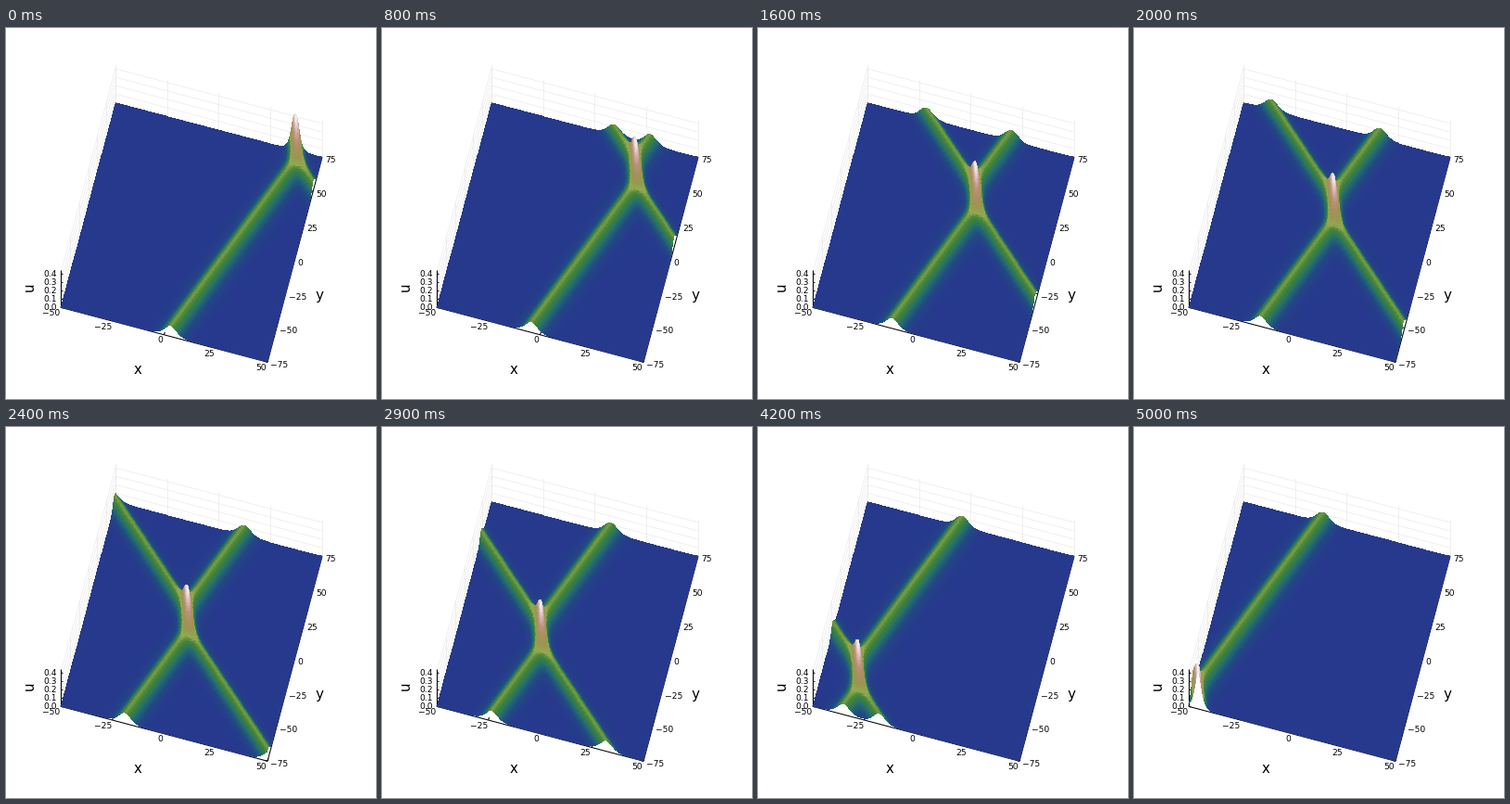
A matplotlib script that plays this animation: 399x400 px, repeating every 5.05 s.

```python
import numpy as np
import matplotlib.pyplot as plt
from matplotlib.animation import FuncAnimation
from matplotlib.collections import LineCollection
from matplotlib.colors import LinearSegmentedColormap

W, H, DPI = 399, 400, 100
FRAMES, STEP = 101, 50

# two line solitons of the KP equation with equal wave number K
K = 0.5
P1, P2 = -0.2625, 0.745
GAP = (P1 - P2) ** 2
A = GAP / (GAP - 4 * K * K)
TOP = 0.444

STOPS = [
    (0.00, "#26398c"), (0.02, "#25408a"), (0.05, "#204a80"),
    (0.10, "#20607a"), (0.16, "#2d7560"), (0.21, "#38803f"),
    (0.26, "#4f8a3a"), (0.285, "#7a9c48"), (0.31, "#94a850"),
    (0.42, "#98964f"), (0.55, "#a8905c"), (0.70, "#b9917a"),
    (0.82, "#cdaaa0"), (0.92, "#dfcccb"), (1.00, "#f2eef0"),
]
CMAP = LinearSegmentedColormap.from_list("relief", STOPS, N=512)


def project(x, y, z=0.0):
    px = 200 + 2.23 * x + 0.3933 * y
    py = 220.3 + 0.59 * x - 1.473 * y - 91 * z
    return px, py


def height(x, y, t):
    e1 = np.exp(K * (x + P1 * y + (K * K + 3 * P1 * P1) * t))
    e2 = np.exp(K * (x + P2 * y + (K * K + 3 * P2 * P2) * t))
    both = A * e1 * e2
    f = 1 + e1 + e2 + both
    fx = K * (e1 + e2 + 2 * both) / f
    fxx = K * K * (e1 + e2 + 4 * both) / f
    return 2 * (fxx - fx * fx)


def line(a, b):
    return [project(*a), project(*b)]


fig = plt.figure(figsize=(W / DPI, H / DPI), dpi=DPI, facecolor="white")
ax = fig.add_axes([0, 0, 1, 1])
ax.set_xlim(0, W)
ax.set_ylim(H, 0)
ax.axis("off")

xticks = range(-50, 51, 25)
yticks = range(-75, 76, 25)
zticks = [0, 0.1, 0.2, 0.3, 0.4]

grid = [line((x, 75, 0), (x, 75, TOP)) for x in xticks]
grid += [line((-50, y, 0), (-50, y, TOP)) for y in yticks]
for z in zticks:
    grid.append(line((-50, 75, z), (50, 75, z)))
    grid.append(line((-50, -75, z), (-50, 75, z)))
ax.add_collection(LineCollection(grid, colors="#eaeaea", linewidths=0.5, zorder=1))

axes = [line((-50, -75, 0), (50, -75, 0)),
        line((50, -75, 0), (50, 75, 0)),
        line((-50, -75, 0), (-50, -75, TOP))]
axes += [line((x, -75, 0), (x, -73, 0)) for x in xticks]
axes += [line((50, y, 0), (48.7, y, 0)) for y in yticks]
axes += [line((-50, -75, z), (-48.9, -75, z)) for z in zticks]
ax.add_collection(LineCollection(axes, colors="black", linewidths=0.75, zorder=2))


def label(x, y, text, px, **kw):
    ax.text(x, y, text, fontsize=px * 72 / DPI, family="DejaVu Sans",
            va="center_baseline", zorder=5, **kw)


def number(v):
    return str(v).replace("-", "\u2212")


for x in xticks:
    px, py = project(x, -75)
    label(px - 1, py + 5, number(x), 9.2, ha="right")
for y in yticks:
    px, py = project(50, y)
    label(px + 3, py + 2.5, number(y), 9.2, ha="left")
for z in zticks:
    px, py = project(-50, -75, z)
    label(px - 4, py - 0.3, f"{z:.1f}", 9.2, ha="right")
label(142, 367, "x", 15, ha="center")
label(338, 287, "y", 15, ha="center")
label(25, 281, "u", 15, ha="center", rotation=90)

# rows run from back to front so that nearer cells cover farther ones
X, Y = np.meshgrid(np.linspace(-50, 50, 226), np.linspace(75, -75, 176))
XM = (X[1:, 1:] + X[:-1, :-1]) / 2
YM = (Y[1:, 1:] + Y[:-1, :-1]) / 2
sheet = []


def draw(i):
    while sheet:
        sheet.pop().remove()
    t = i - 50
    px, py = project(X, Y, height(X, Y, t))
    mesh = ax.pcolormesh(px, py, height(XM, YM, t), cmap=CMAP, vmin=0, vmax=TOP,
                         shading="flat", antialiased=False, zorder=3)
    ax.set_xlim(0, W)
    ax.set_ylim(H, 0)
    sheet.append(mesh)
    return sheet


anim = FuncAnimation(fig, draw, frames=FRAMES, interval=STEP,
                     init_func=lambda: [], repeat=True, repeat_delay=0)
plt.show()
```
